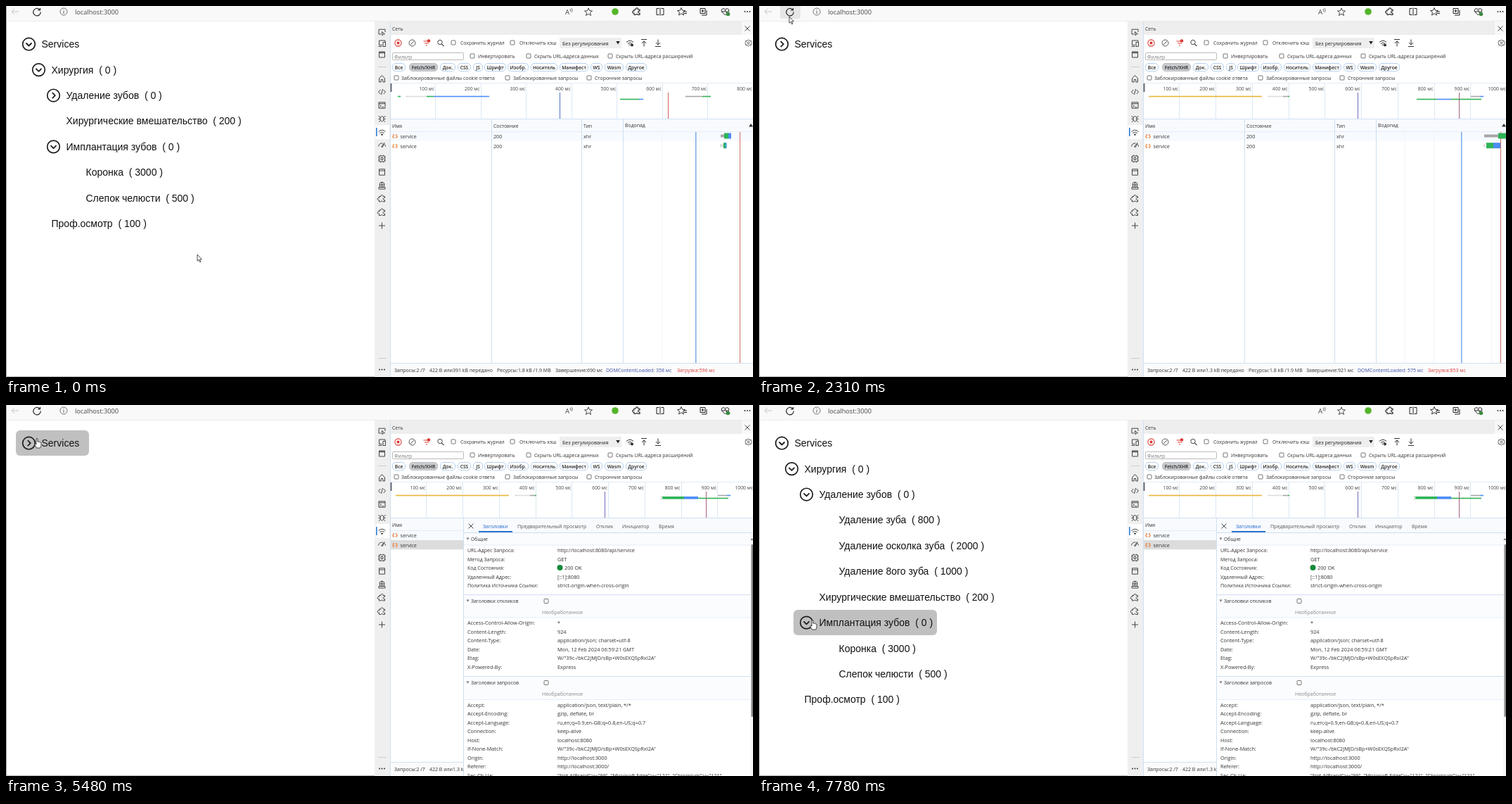
Recreate the animation shown at these times as an HTML page with a canvas. Size 1062 px wide and 527 px high, loop 8 s.

```html
<!DOCTYPE html>
<html lang="ru">
<head>
<meta charset="utf-8">
<title>Services</title>
<style>
html, body { margin: 0; width: 100%; height: 100%; overflow: hidden; background: #fff; }
canvas { display: block; }
</style>
</head>
<body>
<canvas id="stage" width="1062" height="527"></canvas>
<script>
const g = document.getElementById('stage').getContext('2d');
const LOOP = 8000;
const UI = '"Open Sans", "Noto Sans", sans-serif';
const TREE_FONT = '14px "Liberation Sans", Arial, sans-serif';
const GREEN = '#2fb457', BLUE = '#4c8df6', GRAY = '#a6a6a6', PALE = '#dcdcdc', YELLOW = '#e8b63a';
const LINE = '#cfe0f3', INK = '#333', RED = '#d93a34';

// time, x, y of the pointer
const moves = [
  [0, 272, 353], [250, 230, 300], [380, 49, 238], [630, -50, -50], [910, 55, 21], [1040, 46, 18],
  [1180, 43, 15], [2460, 401, 82], [2720, 493, 103], [2870, 631, 150], [3140, 622, 166],
  [3270, 606, 187], [3400, 597, 195], [4190, 648, 206], [4320, 735, 222], [4450, 800, 232],
  [4580, 812, 231], [4710, 530, 142], [4850, 298, 78], [5100, 112, 60], [5230, 58, 50],
  [5350, 44, 48], [5860, 45, 56], [5990, 46, 68], [6120, 46, 82], [6250, 47, 87],
  [6500, 53, 97], [6630, 62, 114], [6760, 66, 120], [7020, 67, 150], [7150, 69, 205],
  [7280, 72, 262], [7400, 75, 298], [7530, 76, 306]
];

function rect(x, y, w, h, c) { g.fillStyle = c; g.fillRect(x, y, w, h); }
function hline(x1, x2, y, c = LINE) { rect(x1, y, x2 - x1, 1, c); }
function vline(x, y1, y2, c = LINE) { rect(x, y1, 1, y2 - y1, c); }
function text(s, x, y, size = 6.9, c = INK, weight = 400, align = 'left') {
  g.font = `${weight} ${size}px ${UI}`;
  g.textAlign = align;
  g.fillStyle = c;
  g.fillText(s, x, y + size * 0.36);
}
function round(x, y, w, h, r, fill, stroke, lw = 1) {
  g.beginPath();
  g.roundRect(x, y, w, h, r);
  if (fill) { g.fillStyle = fill; g.fill(); }
  if (stroke) { g.strokeStyle = stroke; g.lineWidth = lw; g.stroke(); }
}
function icon(d, x, y, c = INK, lw = 1, fill) {
  g.save();
  g.translate(x, y);
  const p = new Path2D(d);
  if (fill) { g.fillStyle = fill; g.fill(p); }
  if (lw) { g.strokeStyle = c; g.lineWidth = lw; g.lineJoin = 'round'; g.stroke(p); }
  g.restore();
}
function circle(x, y, r, fill, stroke, lw = 1) {
  g.beginPath();
  g.arc(x, y, r, 0, 7);
  if (fill) { g.fillStyle = fill; g.fill(); }
  if (stroke) { g.strokeStyle = stroke; g.lineWidth = lw; g.stroke(); }
}
function check(x, y, label, lx) {
  round(x - 3, y - 3, 6, 6, 1, '#fff', '#666', 0.9);
  if (label) text(label, lx, y + 1);
}
function dots(x, y) { for (const d of [-3.5, 0, 3.5]) circle(x + d, y, 0.9, '#222'); }

const STAR = 'M0-5.5L1.6-1.8L5.5-1.5L2.5 1L3.5 5L0 2.8L-3.5 5L-2.5 1L-5.5-1.5L-1.6-1.8Z';
const PUZZLE = 'M-4-3H-1.5A1.6 1.6 0 1 1 1.5-3H4V-.8A1.6 1.6 0 1 0 4 2V4.5H1.2A1.5 1.5 0 0 0-1.6 4.5H-4V2A1.6 1.6 0 1 1-4-.8Z';
const BOX = 'M-4-4.2H4V4.2H-4ZM-4-2H4';
const WIFI = 'M-5-1.5Q0-6 5-1.5M-3.2.6Q0-2.4 3.2.6M-1.4 2.6Q0 1.2 1.4 2.6';
const GEAR = 'M0-4.5L1.5-3.2L3.8-3L3.8-1L4.8 0L3.8 1.2L3.8 3L1.5 3.2L0 4.5L-1.5 3.2L-3.8 3L-3.8 1.2L-4.8 0L-3.8-1L-3.8-3L-1.5-3.2ZM1.4 0A1.4 1.4 0 1 1-1.4 0A1.4 1.4 0 1 1 1.4 0';
const CROSS = 'M-3.5-3.5L3.5 3.5M3.5-3.5L-3.5 3.5';

function topBar(t) {
  rect(0, 0, 1062, 21, '#f9f9f9');
  hline(0, 1062, 21, '#ececec');
  if (t >= 1180 && t < 2460) round(30, -3, 29, 21, 3, '#e6e6e6');
  icon('M5 0H-5M-1-4L-5 0L-1 4', 13, 8, '#c4c4c4');
  icon('M3.6-3.6A5.2 5.2 0 1 0 5.2 0M4.5-5.5V-2.6H1.3', 44, 8.5, '#222', 1.2);
  circle(82, 8, 5, null, '#666', 0.9);
  icon('M0-.8V2.8M0-2.8V-1.9', 82, 8, '#555', 1);
  text('localhost:3000', 98, 8.5, 9.2, '#444');
  text('A', 795, 9, 9.5, '#444');
  icon('M0-3Q1.6-1 0 1M2-4Q4.5-1 2 2', 802, 7, '#555', 0.8);
  icon(STAR, 828, 8.5, '#333', 0.9);
  circle(866, 8, 4.8, '#55b52a');
  icon(PUZZLE, 897, 8, '#222', 1.1);
  icon('M-1.5-4.5H-5V4.5H-1.5M1.5-4.5H5V4.5H1.5M0-5.5V5.5', 930, 8, '#222');
  icon(STAR, 960, 8, '#222', 0.9);
  icon('M0 0H5M1 2.5H5', 963, 8, '#222');
  icon('M-5-5H2V2H-5ZM4-2.5V4.5H-3M-1.5-3.5V.5M-3.5-1.5H.5', 992, 8.5, '#222');
  icon('M0 5L-5 0Q-6-4-2.8-4.3Q-.6-4.4 0-2.5Q.6-4.4 2.8-4.3Q6-4 5 0ZM-4.5 0H-1L0-2L1.5 1.5L2.5 0H4', 1022.5, 8, '#222');
  circle(1026.5, 11.5, 2.8, '#3d8b40');
  dots(1054, 8);
}

function sidebar() {
  rect(524, 22, 22, 505, '#efefef');
  rect(525, 169, 20, 20, '#fff');
  rect(526, 173, 1.6, 12, '#2b7cd3');
  const icons = [
    [37, 'M4.5 0V-3.8H-4.5V3H-1M0-.5L4 2.8L1.8 3L.6 4.8Z'],
    [53, 'M4.5-1.5V-4H-4V2.5H0M1.5-1.5H5V4.5H1.5ZM-5 4.5H0'],
    [69, 'M-4-4H4V4H-4ZM-4-3H4M-4-2.3H4'],
    [103, 'M-4 0L0-4.5L4 0V5H1.3V1.5H-1.3V5H-4Z'],
    [122, 'M-2.2-3L-5 0L-2.2 3M2.2-3L5 0L2.2 3M1-4L-1 4'],
    [141, 'M-4.5-4.2H4.5V4.2H-4.5ZM-4.5-2.3H4.5M-3-.8L-1 1L-3 2.7M0 2.7H2.6'],
    [160, 'M-2.4-2Q0-5 2.4-2V2Q0 6 -2.4 2ZM-5-4L-2.4-1.2M5-4L2.4-1.2M-5 .5H-2.4M5 .5H2.4M-4.6 4.6L-2.2 2.5M4.6 4.6L2.2 2.5'],
    [180, WIFI],
    [198, 'M-5 1.5Q-4-3.5 1-3M3-2Q5-.5 5 1.5M-1 2L3.5-3.5L.8 2.5Z'],
    [217, 'M-4-4H4V4H-4ZM-1.5-1.5H1.5V1.5H-1.5ZM-2-5.3V-4M2-5.3V-4M-2 4V5.3M2 4V5.3M-5.3-2H-4M-5.3 2H-4M4-2H5.3M4 2H5.3'],
    [236, BOX],
    [255, 'M3.5-1A3.5 3.8 0 1 1-3.5-1A3.5 3.8 0 1 1 3.5-1M-3.5-1H3.5M0-4.8V2.8M-4.5 5V2.5H4.5V5Z'],
    [273.5, PUZZLE], [293, PUZZLE],
    [312, 'M-4.5 0H4.5M0-4.5V4.5']
  ];
  for (const [y, d] of icons) icon(d, 534.5, y, '#444', 1);
  circle(534.5, 183, 1, '#333');
  hline(529, 541, 86, '#ccc');
  hline(529, 541, 500, '#ccc');
  dots(534.5, 516.5);
}

function toolbar() {
  rect(546, 22, 516, 19, '#eeeeee');
  rect(1046, 22, 16, 19, '#f8f8f8');
  vline(546, 22, 527);
  text('Сеть', 549, 33);
  icon(CROSS, 1054, 32, '#333', 0.9);
  circle(557.5, 52.5, 4.6, null, RED, 1.1);
  rect(555.7, 50.7, 3.6, 3.6, RED);
  circle(577.5, 52.5, 4.5, null, '#555');
  icon('M3-3L-3 3', 577.5, 52.5, '#555');
  icon('M-4.5-2.5H2M-3 .5H3M-1 3.5H1', 598, 52.5, RED, 1.2);
  circle(601, 49.5, 2.3, RED);
  circle(617, 51.5, 3.2, null, '#444');
  icon('M0 0L3.2 3.2', 619.3, 53.8, '#444', 1.2);
  check(636, 52, 'Сохранить журнал', 646);
  check(720, 52, 'Отключить кэш', 730);
  rect(787, 45, 88, 15, '#eeeeee');
  text('Без регулирования', 791, 53, 7, '#222');
  icon('M-2.7-2H2.7L0 2.4Z', 870, 52, '#222', 0, '#222');
  icon(WIFI, 887, 53, '#333');
  circle(890, 55.5, 2, '#333');
  icon('M-4-5H4M0 5V-2.5M-3 .5L0-2.8L3 .5', 907, 52.5);
  icon('M-4 5H4M0-5V2.5M-3-.5L0 2.8L3-.5', 927, 52.5);
  icon(GEAR, 1055.5, 52.5, '#444', 0.9);

  round(549.5, 66.5, 101, 10, 1, '#fff', '#aaa', 0.8);
  text('Фильтр', 552, 72, 7, '#777');
  check(663, 71, 'Инвертировать', 671);
  check(743, 71, 'Скрыть URL-адреса данных', 751);
  check(859, 71, 'Скрыть URL-адреса расширений', 867);
  const chips = [
    ['Все', 549, 568], ['Fetch/XHR', 573, 614], ['Док.', 617, 639], ['CSS', 642, 661], ['JS', 664, 678],
    ['Шрифт', 680, 711], ['Изобр.', 713, 743], ['Носитель', 746, 784], ['Манифест', 787, 828],
    ['WS', 831, 848], ['Wasm', 851, 878], ['Другое', 881, 911]
  ];
  for (const [s, a, b] of chips) {
    const on = s === 'Fetch/XHR';
    round(a + 0.5, 81.5, b - a - 1, 11, 4.5, on ? '#c9cccf' : '#fff', on ? '#b5babf' : '#aecbeb', 0.9);
    text(s, (a + b) / 2, 87.3, 6.7, '#222', 600, 'center');
  }
  check(555, 102, 'Заблокированные файлы cookie ответа', 562);
  check(713, 102, 'Заблокированные запросы', 721);
  check(829, 102, 'Сторонние запросы', 837);
}

// bars are [from, to, y, colour]; marks are [x, colour]
const phases = {
  before: {
    step: 64.55, unit: 100,
    bars: [[557, 561, 128, GREEN], [568, 598, 128, PALE], [598, 608, 128, GREEN], [608, 687, 128, BLUE],
      [873, 900, 132, GREEN], [900, 906, 132, BLUE], [966, 990, 128, GRAY], [990, 1002, 128, GREEN]],
    marks: [[787, '#4a72c4'], [941, '#d06060']],
    grid: [932, 986, 1040], lines: [980, 1043],
    rows: [[[1016, 1021, GRAY], [1021, 1027, GREEN], [1027, 1031, BLUE]],
      [[1015, 1020, PALE], [1020, 1022, GREEN], [1022, 1024.5, '#3a9fb8']]],
    foot: [[552, 'Запросы:2 /7'], [602, '422 В или391 kB передано'], [698, 'Ресурсы:1.8 kB /1.9 MB'],
      [781, 'Завершение:690 мс'], [853, 'DOMContentLoaded: 358 мс', '#3a4fa8'], [954, 'Загрузка:596 мс', RED]]
  },
  loading: {
    step: 48.1, unit: 10,
    bars: [[562, 872, 128, YELLOW], [872, 877, 128, GREEN], [890, 935, 128, PALE], [935, 946, 128, GRAY],
      [946, 952, 128, GREEN], [952, 971, 128, BLUE]],
    marks: [], grid: [917, 965, 1013, 1059], lines: [], rows: [],
    foot: [[552, 'Запросы:0 /2'], [602, '0 В или601 В передано'], [686, 'Ресурсы:0 В /1.9 MB'], [759, 'Завершение:406 мс']]
  },
  after: {
    step: 51.75, unit: 100,
    bars: [[554, 715, 128, YELLOW], [723, 745, 128, PALE], [745, 752, 128, GRAY], [752, 754, 128, GREEN],
      [935, 964, 132, GREEN], [964, 984, 132, BLUE], [984, 1027, 132, GREEN], [1012, 1025, 128, GRAY], [1025, 1030, 128, BLUE]],
    marks: [[851, '#6c6cb8'], [995, '#a0607c']],
    grid: [918, 959, 1041], lines: [998, 1054],
    rows: [[[1031, 1051, GRAY], [1051, 1062, GREEN]],
      [[1030, 1032, PALE], [1034, 1044, GREEN], [1044, 1054, BLUE]]],
    foot: [[552, 'Запросы:2 /7'], [602, '422 В или1.3 kB передано'], [696, 'Ресурсы:1.8 kB /1.9 MB'],
      [778, 'Завершение:921 мс'], [851, 'DOMContentLoaded: 575 мс', '#3a4fa8'], [951, 'Загрузка:853 мс', RED]]
  }
};

function overview(p, picked) {
  hline(546, 1062, 109, '#e2ebf5');
  for (let k = 1, x; (x = 546 + k * p.step) < 1100; k++) {
    vline(Math.floor(x), 110, 160, '#dce8f4');
    text(k * p.unit + ' мс', x - 1.5, 117.5, 6.8, '#444', 400, 'right');
  }
  for (const [a, b, y, c] of p.bars) rect(a, y - 0.3, b - a, 1.6, c);
  if (picked) {
    rect(933, 130, 31, 3.5, GREEN);
    rect(964, 130, 20, 3.5, BLUE);
    vline(931, 129, 135, '#ccc');
  }
  for (const [x, c] of p.marks) vline(x, 123, 160, c);
  rect(546.5, 110, 2, 12, '#667');
}

function table(p, t, px, py) {
  const open = t >= 3680, end = open ? 650 : 1062;
  rect(547, 161, 515, 17, '#f8fafd');
  hline(546, 1062, 160);
  hline(546, 1062, 178);
  p.rows.forEach((bars, i) => {
    const y = 178.5 + i * 13.5;
    const hover = p === phases.after && t < 3680 && px > 546 && py >= y && py < y + 13.5;
    rect(547, y, end - 547, 13.2, hover ? '#f0f0f0' : i ? '#fff' : '#f7faff');
    if (open && i) {
      const focus = t < 5480;
      rect(547, y, 103, 13.2, focus ? '#cfcfcf' : '#dcdcdc');
      if (focus) round(547.5, y + 0.5, 102, 12.2, 0, null, '#777', 0.9);
    }
    text('{:}', 549, y + 6, 7.5, '#e8762d', 700);
    text('service', 560.5, y + 7, 7.2);
    if (open) return;
    text('200', 693, y + 7, 7.2);
    text('xhr', 821, y + 7, 7.2);
  });
  text('Имя', 549, 170.5);
  if (!open) {
    text('Состояние', 693, 170.5);
    text('Тип', 821, 170.5);
    text('Водопад', 880, 170);
    icon('M-3 2H3L0-2.4Z', 1059, 169.5, INK, 0, INK);
    for (const x of [690, 818, 877]) vline(x, 161, 507);
    for (const x of p.grid) vline(x, 179, 507, '#f0f5fa');
    p.lines.forEach((x, i) => rect(x, 179, i ? 1 : 1.5, 328, i ? '#d0706a' : '#7aa8ea'));
    p.rows.forEach((bars, i) => {
      for (const [a, b, c] of bars) {
        const h = c === GRAY || c === PALE ? 4 : 8;
        rect(a, 184.5 + i * 13.7 - h / 2, b - a, h, c);
      }
    });
  }
  rect(547, 508, 515, 19, '#fbfbfb');
  hline(546, end, 507);
  g.save();
  g.beginPath();
  g.rect(546, 508, end - 546, 19);
  g.clip();
  for (const [x, s, c] of p.foot) text(s, x, 517.5, 7, c);
  g.restore();
}

const sections = [
  [190, 'Общие', 206.5, [
    ['URL-Адрес Запроса:', 'http://localhost:8080/api/service'], ['Метод Запроса:', 'GET'],
    ['Код Состояния:', '200 OK'], ['Удаленный Адрес:', '[::1]:8080'],
    ['Политика Источника Ссылки:', 'strict-origin-when-cross-origin']]],
  [278, 'Заголовки откликов', 309.5, [
    ['Access-Control-Allow-Origin:', '*'], ['Content-Length:', '924'],
    ['Content-Type:', 'application/json; charset=utf-8'], ['Date:', 'Mon, 12 Feb 2024 06:59:21 GMT'],
    ['Etag:', 'W/"39c-/bkC2JMJD/sBp+W0sEXQSpRxI2A"'], ['X-Powered-By:', 'Express']]],
  [394, 'Заголовки запросов', 426, [
    ['Accept:', 'application/json, text/plain, */*'], ['Accept-Encoding:', 'gzip, deflate, br'],
    ['Accept-Language:', 'ru,en;q=0.9,en-GB;q=0.8,en-US;q=0.7'], ['Connection:', 'keep-alive'],
    ['Host:', 'localhost:8080'], ['If-None-Match:', 'W/"39c-/bkC2JMJD/sBp+W0sEXQSpRxI2A"'],
    ['Origin:', 'http://localhost:3000'], ['Referer:', 'http://localhost:3000/'],
    ['Sec-Ch-Ua:', '"Not A(Brand";v="99", "Microsoft Edge";v="121", "Chromium";v="121"']]]
];

function details() {
  rect(650, 161, 412, 366, '#fff');
  rect(650, 161, 412, 20, '#f8fafd');
  hline(650, 1062, 181);
  vline(650, 161, 527);
  icon(CROSS, 661, 172, '#333', 0.9);
  const tabs = [[678, 'Заголовки'], [727, 'Предварительный просмотр'], [839, 'Отклик'], [876, 'Инициатор'], [928, 'Время']];
  tabs.forEach(([x, s], i) => text(s, x, 172, 7, i ? '#555' : '#1a66c9'));
  rect(672, 179, 48, 1.8, '#1a66c9');
  sections.forEach(([y, title, first, rows], i) => {
    const bottom = first - 8;
    rect(651, y - 8, 407, bottom - y + 8, '#fbfcfe');
    if (i) hline(651, 1058, y - 9);
    hline(651, 1058, bottom, '#e3edf8');
    icon('M-2-1.5H2L0 1.7Z', 656.5, y, '#777', 0, '#777');
    text(title, 661, y + 0.5);
    if (i) {
      check(768, y + 0.5);
      text('Необработанное', 762, y + 16, 7, '#888');
    }
    rows.forEach(([key, val], k) => {
      const ry = first + k * 12.55, status = val === '200 OK';
      text(key, 656, ry, /[А-я]/.test(key) ? 7 : 7.3);
      if (status) circle(787.5, ry - 0.7, 4, '#168a3a');
      text(val, status ? 794 : 784, ry, 7.3);
    });
  });
  rect(1058, 182, 4, 345, '#f6f6f6');
  round(1059.5, 198, 2.5, 245, 1, '#858585');
  icon('M-2 1.5H2L0-1.5Z', 1060.5, 190.5, '#777', 0, '#777');
}

function treeRows(t) {
  if (t >= 2060 && t < 2310) return [];
  const old = t < 2060;
  const after = ms => old || t >= ms;
  const root = after(5610), surgery = after(6380), removal = !old && t >= 6890, implant = after(7780);
  const rows = [[0, 'Services', null, root]];
  const add = (...r) => rows.push(r);
  if (!root) return rows;
  add(1, 'Хирургия', 0, surgery);
  if (surgery) {
    add(2, 'Удаление зубов', 0, removal);
    if (removal) {
      add(3, 'Удаление зуба', 800);
      add(3, 'Удаление осколка зуба', 2000);
      add(3, 'Удаление 8ого зуба', 1000);
    }
    add(2, 'Хирургические вмешательство', 200);
    add(2, 'Имплантация зубов', 0, implant);
    if (implant) {
      add(3, 'Коронка', 3000);
      add(3, 'Слепок челюсти', 500);
    }
  }
  add(1, 'Проф.осмотр', 100);
  return rows;
}

// returns true when the pointer is over an item
function tree(t, px, py) {
  let over = false;
  treeRows(t).forEach(([level, name, price, open], i) => {
    const y = 54.2 + i * 36.42, x = 32.5 + 7 * level * (level + 3) / 2;
    const label = name + '  ' + (price === null ? '' : `( ${price} )`);
    g.font = TREE_FONT;
    g.textAlign = 'left';
    const left = x - 18.5, right = Math.round(x + 24 + g.measureText(label).width);
    if (px >= left && px < right && Math.abs(py - y) < 18.2) {
      over = true;
      round(left, Math.round(y) - 18, right - left, 36, 6, '#c0c0c0');
    }
    g.fillStyle = '#111';
    g.fillText(label, x + 18, Math.round(y + 5));
    if (open === undefined) return;
    circle(x, y, 8.8, null, '#1c1c1c', 1.7);
    icon(open ? 'M-4-1.7L0 2.3L4-1.7' : 'M-1.7-4L2.3 0L-1.7 4', x, y, '#1c1c1c', 1.8);
  });
  return over;
}

function pointer(x, y, hand) {
  if (hand) icon('M-1 0Q0-1 1 0V4.2Q2 3.5 2.8 4.4Q4 3.9 4.5 4.9Q5.8 4.6 6 6V9Q5.8 11 4.8 13H-.6Q-1.8 10.5-3.2 8.6Q-3.4 6.8-1 8Z', x, y, '#222', 0.8, '#fff');
  else icon('M0 0V9.3L2.1 7.4L3.7 10.8L5 10.2L3.5 6.9H6.3Z', x, y, '#222', 0.8, '#fff');
}

function draw(t) {
  const [, px, py] = moves.findLast(m => m[0] <= t);
  const p = t < 1450 ? phases.before : t < 2310 ? phases.loading : phases.after;
  rect(0, 0, 1062, 527, '#fff');
  const hand = tree(t, px, py);
  topBar(t);
  vline(0, 0, 527, '#a8a8a8');
  hline(0, 524, 526, '#b8b8b8');
  sidebar();
  toolbar();
  overview(p, t >= 3680);
  table(p, t, px, py);
  if (t >= 3680) details();
  pointer(px, py, hand);
}

const start = performance.now();
function tick() {
  draw((performance.now() - start) % LOOP);
  requestAnimationFrame(tick);
}
tick();
</script>
</body>
</html>
```
